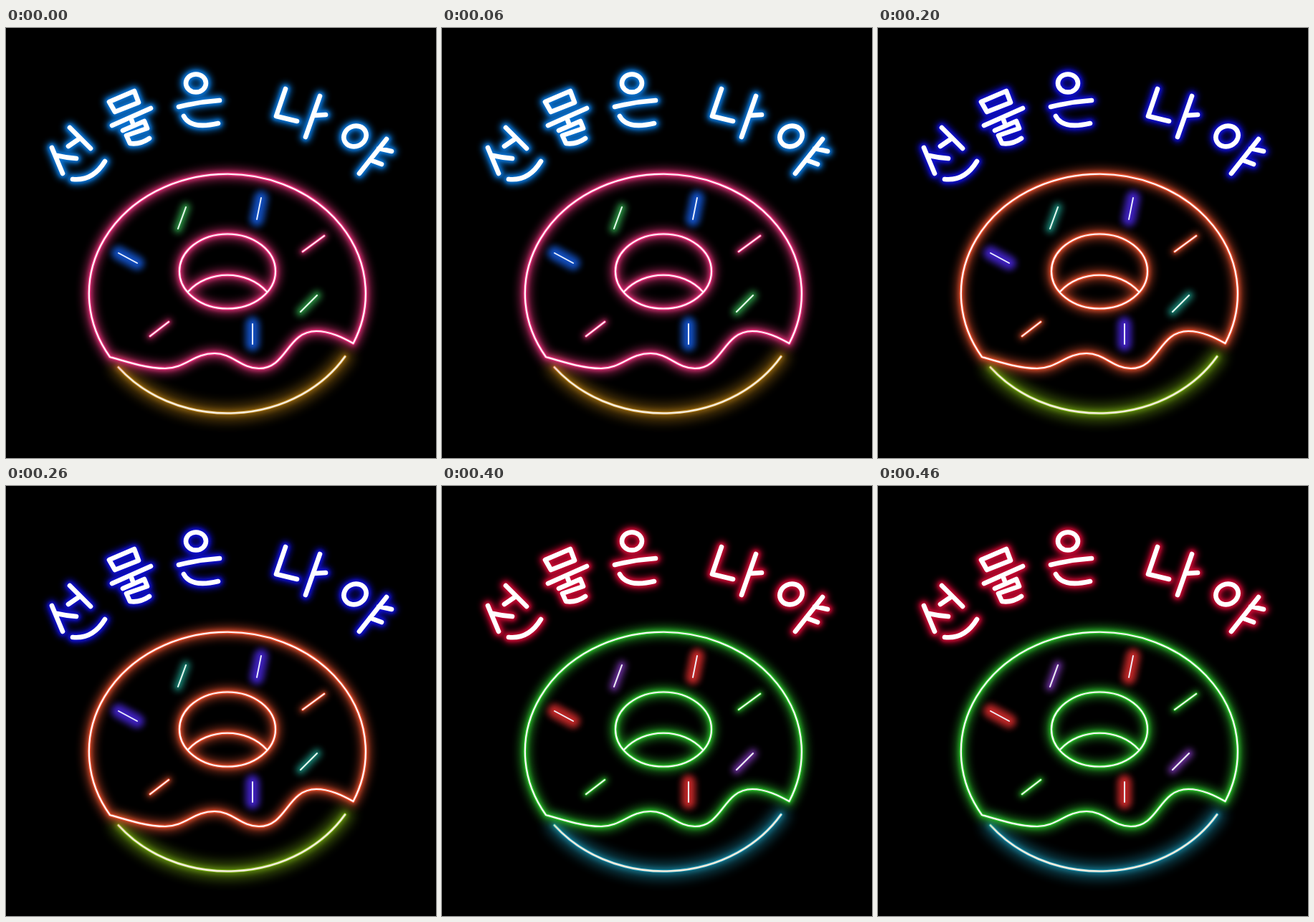
Recreate the animation shown at these times as an HTML page. Size 600x600 px, loop 0.5 s.

```html
<!DOCTYPE html>
<html lang="ko">
<head>
<meta charset="utf-8">
<title>선물은 나야</title>
<style>
  html, body { margin: 0; width: 100%; height: 100%; overflow: hidden; background: #000; }
  svg { display: block; width: 600px; height: 600px; }
  path { fill: none; stroke: currentColor; stroke-linecap: round; stroke-linejoin: round; }
  .core { stroke: color-mix(in srgb, currentColor var(--tint), white); }
</style>
</head>
<body>
<svg id="sign" viewBox="0 0 600 600" role="img" aria-label="선물은 나야"></svg>
<script>
const STEP = 100;
const sign = document.getElementById('sign');

const ellipse = (cx, cy, rx, ry, turn = 0) => {
  const a = turn * Math.PI / 180, dx = rx * Math.cos(a), dy = rx * Math.sin(a);
  const arc = `A${rx} ${ry} ${turn} 0 1`;
  return `M${cx - dx} ${cy - dy}${arc} ${cx + dx} ${cy + dy}${arc} ${cx - dx} ${cy - dy}Z`;
};

const lettering = [
  // 선
  'M64 167L79 203M71 178Q84 181 98 182M89 139L118 168M103 154L87 165M93 211Q121 214 138 186',
  // 물
  'M144 103L179 88L185 104L152 117ZM148 136L202 112M174 125L178 136',
  'M163 143L193 130L197 140L168 150L173 161Q187 163 200 154',
  // 은
  ellipse(265, 77, 14, 12.5),
  'M241 110Q269 103 298 101M248 123Q258 142 296 133',
  // 나
  'M390 85L377 123L406 130M438 95L418 152M430 122L446 121',
  // 야
  ellipse(487, 151, 16, 14, -25),
  'M531 155L493 203M520 168L538 172M508 184L524 190'
].join('');

const icing = [
  'M145 459A193 167 0 1 1 484.5 440',
  'C470 432 452 423 433 423C392 423 392 475 353 475',
  'C328 475 316 454 291 454C262 454 250 475 222 475C198 475 172 467 145 459Z',
  ellipse(309, 339.5, 67, 52),
  'M254 368C282 337 336 337 364 368'
].join('');

// glow: [width, blur, opacity], widest first; core: [width, tint]
const tubes = [
  {
    d: 'M157 473.5A193 167 0 0 0 473 458.5',
    glow: [[24, 8, .45], [9, 3, .55], [4.5, .6, .9]], core: [2.6, 14],
    colors: ['#b47c14', '#c02a1c', '#7db414', '#4420d0', '#1c96b4']
  },
  {
    d: icing,
    glow: [[17, 6, .5], [8, 2.5, .65], [4.4, .5, 1]], core: [2.2, 4],
    colors: ['#e8337c', '#b828dc', '#e6502e', '#1cb8c4', '#2cc02c']
  },
  {
    d: 'M444 290L414 312M227 410L201 430',
    glow: [[12, 5, .45], [6, 2, .5], [3.6, .5, 1]], core: [2, 6],
    colors: ['#e8337c', '#b828dc', '#e6502e', '#1cb8c4', '#2cc02c']
  },
  {
    d: 'M251 250L240 280M434 373L411 396',
    glow: [[14, 4.5, .7], [6, 2, .5], [3, .5, .9]], core: [1.9, 8],
    colors: ['#2f9c48', '#5c8c20', '#1c8c7c', '#b03c56', '#7434a8']
  },
  {
    d: 'M356 237L350 267M157 314L183 328M344 413L344 441',
    glow: [[20, 4.5, .85], [7, 2, .5], [3, .5, .8]], core: [1.9, 8],
    colors: ['#1454cc', '#129c9c', '#4424cc', '#a4ac10', '#cc2a2a']
  },
  {
    d: lettering,
    glow: [[17, 4, .7], [11, 2, .9]], core: [6.6, 0],
    colors: ['#0a78dc', '#08a870', '#1010dc', '#b4a000', '#d00834']
  }
];

const add = (parent, name, attrs = {}) => {
  const node = document.createElementNS('http://www.w3.org/2000/svg', name);
  for (const key in attrs) node.setAttribute(key, attrs[key]);
  return parent.appendChild(node);
};

for (const { d, glow, core, colors } of tubes) {
  const tube = add(sign, 'g', { style: `--tint:${core[1]}%` });
  for (const [width, blur, opacity] of glow) {
    add(tube, 'path', { d, 'stroke-width': width, opacity, style: `filter:blur(${blur}px)` });
  }
  add(tube, 'path', { d, class: 'core', 'stroke-width': core[0] });

  // Hold each colour for one step, then switch hard.
  const frames = [...colors, colors[0]].map((color, i) => ({
    color, offset: i / colors.length, easing: 'steps(1, end)'
  }));
  tube.animate(frames, { duration: STEP * colors.length, iterations: Infinity });
}
</script>
</body>
</html>
```
